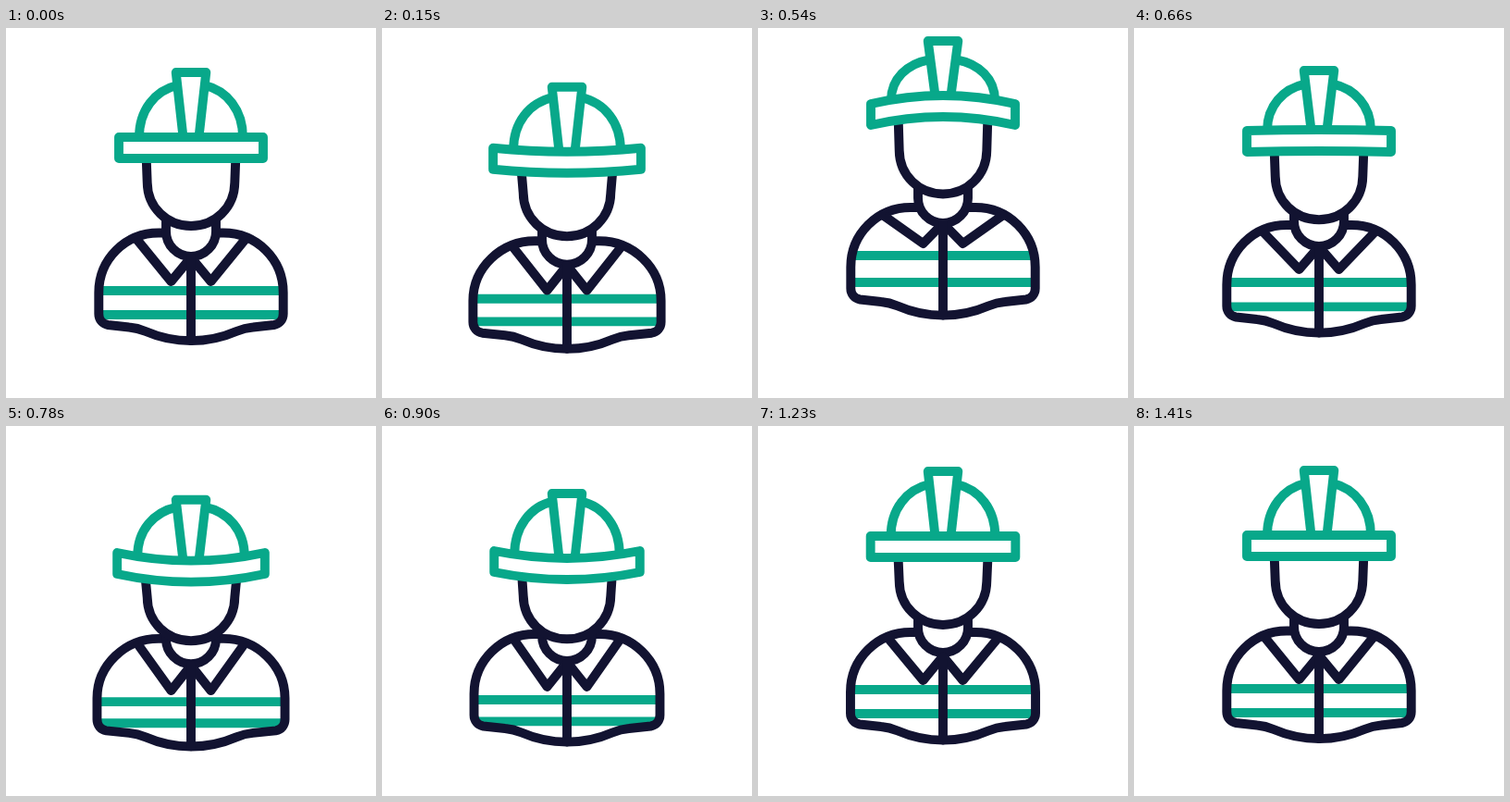
Animation of 400 by 400 pixels, one loop 1440 ms. Source, as an HTML page:

```html
<!DOCTYPE html>
<html lang="en">
<head>
<meta charset="utf-8">
<title>Worker in a hard hat</title>
<style>
  html, body { margin: 0; width: 100%; height: 100%; overflow: hidden; background: #fff; }
  svg { display: block; width: 100vw; height: 100vh; }
  path { fill: none; stroke-width: 9.9; stroke-linecap: butt; stroke-linejoin: round; }
  .green { stroke: #08a88a; }
  .navy { stroke: #121331; }
</style>
</head>
<body>
<svg viewBox="0 0 400 400">
  <path id="stripes" class="green"/>
  <path id="body" class="navy"/>
  <path id="neck" class="navy"/>
  <path id="collar" class="navy"/>
  <path id="zip" class="navy" style="stroke-linecap:round"/>
  <path id="face" class="navy"/>
  <path id="dome" class="green"/>
  <path id="plate" class="green"/>
  <path id="brim" class="green"/>
</svg>
<script>
const LOOP = 1440, STEP = 30;

// Vertical offsets of each part at the key times: crouch, leap, land, settle.
const times = [0, 140, 300, 450, 540, 660, 800, 900, 1080, 1230, 1410];
const tracks = {
  top:    [0, 16, -15, -41, -34, -2, 33, 25, -2, 1, 0],
  brim:   [0, 12, -20.5, -41, -36, -7, 20, 17, -2, 1, 0],
  bend:   [0, 4, -1, -8, -9, -1, 9, 8, 0, 0, 0],
  body:   [0, 9, -23.5, -36, -27.5, -8.5, 9, 3.5, -1.8, 1.5, 0],
  neck:   [0, 9, -26, -41, -36, -11, 11, 7, -5, -2, -3],
  tip:    [0, 10, -28, -46, -41, -13, 13, 8, -2, 1, 0],
  stripe: [0, 9, -23, -42, -38, -9, 15, 12, -2, 1, 0]
};

const slope = (v, i) => (v[i + 1] - v[i]) / (times[i + 1] - times[i]);

// Flat at turning points, smooth everywhere else.
function tangent(v, i) {
  if (i === 0 || i === times.length - 1) return 0;
  const a = slope(v, i - 1), b = slope(v, i);
  return a * b <= 0 ? 0 : 2 * a * b / (a + b);
}

function sample(v, t) {
  let i = 0;
  while (i < times.length - 2 && t > times[i + 1]) i++;
  const h = times[i + 1] - times[i];
  const u = Math.min(1, (t - times[i]) / h), w = 1 - u;
  return v[i] * (1 + 2 * u) * w * w + v[i + 1] * u * u * (3 - 2 * u)
    + h * u * w * (tangent(v, i) * w - tangent(v, i + 1) * u);
}

const set = (id, d) => document.getElementById(id).setAttribute("d", d);

function draw(t) {
  const p = {};
  for (const k in tracks) p[k] = sample(tracks[k], t);

  const wide = Math.max(0, p.body) * 0.22;
  const faceY = p.brim * 0.96;
  const L = 100.3 - wide, R = 400 - L;
  const y = v => v + p.body;

  const s1 = 284 + p.stripe, s2 = 310 + p.stripe - p.bend / 3;
  set("stripes", `M${L} ${s1}H${R}M${L} ${s2}H${R}`);

  set("body", `M173 ${y(221.5)}H165C129 ${y(221.5)} ${L} ${y(250)} ${L} ${y(286)}
    V${y(309)}C${L} ${y(315)} ${L + 4} ${y(320)} ${L + 10} ${y(321)}
    L133 ${y(323.5)}C139 ${y(324)} 145 ${y(325.5)} 151 ${y(328)}
    C182 ${y(341.5)} 218 ${y(341.5)} 249 ${y(328)}
    C255 ${y(325.5)} 261 ${y(324)} 267 ${y(323.5)}L${R - 10} ${y(321)}
    C${R - 4} ${y(320)} ${R} ${y(315)} ${R} ${y(309)}V${y(286)}
    C${R} ${y(250)} 271 ${y(221.5)} 235 ${y(221.5)}H227`);

  const neckY = 220 + p.neck;
  set("neck", `M173 ${Math.min(206 + faceY, neckY)}V${neckY}
    A27 27 0 0 0 227 ${neckY}V${Math.min(206 + faceY, neckY)}`);

  const dx = (p.tip - p.body) * 0.35;
  const cx = 141 + dx, cy = y(228) - dx * 0.55;
  const tipY = 274 + p.tip, apex = 248 + p.tip * 0.9;
  set("collar", `M${cx} ${cy}L178.5 ${tipY}L200 ${apex}L221.5 ${tipY}L${400 - cx} ${cy}`);
  set("zip", `M200 ${apex}V${y(338)}`);

  const brimTop = 118 + p.brim, brimLow = 141 + p.brim;
  const fx = 151.7 - wide * 0.5, chin = 214 + faceY;
  const faceTop = brimLow + p.bend * 0.62;
  set("face", `M${fx} ${faceTop}L152.7 ${chin - 47}C153 ${chin - 20} 174 ${chin} 200 ${chin}
    S247 ${chin - 20} 247.3 ${chin - 47}L${400 - fx} ${faceTop}`);

  const hx = 144 - wide, base = brimTop + p.bend * 0.48;
  const join = 62 + p.top - p.bend * 0.7, rise = base - join;
  set("dome", `M${hx} ${base}C${hx} ${base - rise * 0.52} ${hx + 17} ${join + rise * 0.1} 185 ${join}
    M${400 - hx} ${base}C${400 - hx} ${base - rise * 0.52} ${383 - hx} ${join + rise * 0.1} 215 ${join}`);

  const top = 48 + p.top, mid = brimTop + p.bend;
  set("plate", `M191.5 ${mid}L183.7 ${top}H216.3L208.5 ${mid}`);

  const bx = 122 - wide, ctrl = p.bend * 2;
  set("brim", `M${bx} ${brimTop}Q200 ${brimTop + ctrl} ${400 - bx} ${brimTop}
    V${brimLow}Q200 ${brimLow + ctrl} ${bx} ${brimLow}Z`);
}

const start = performance.now();
function tick() {
  const t = (performance.now() - start) % LOOP;
  draw(Math.floor(t / STEP) * STEP);
  requestAnimationFrame(tick);
}
draw(0);
requestAnimationFrame(tick);
</script>
</body>
</html>
```
